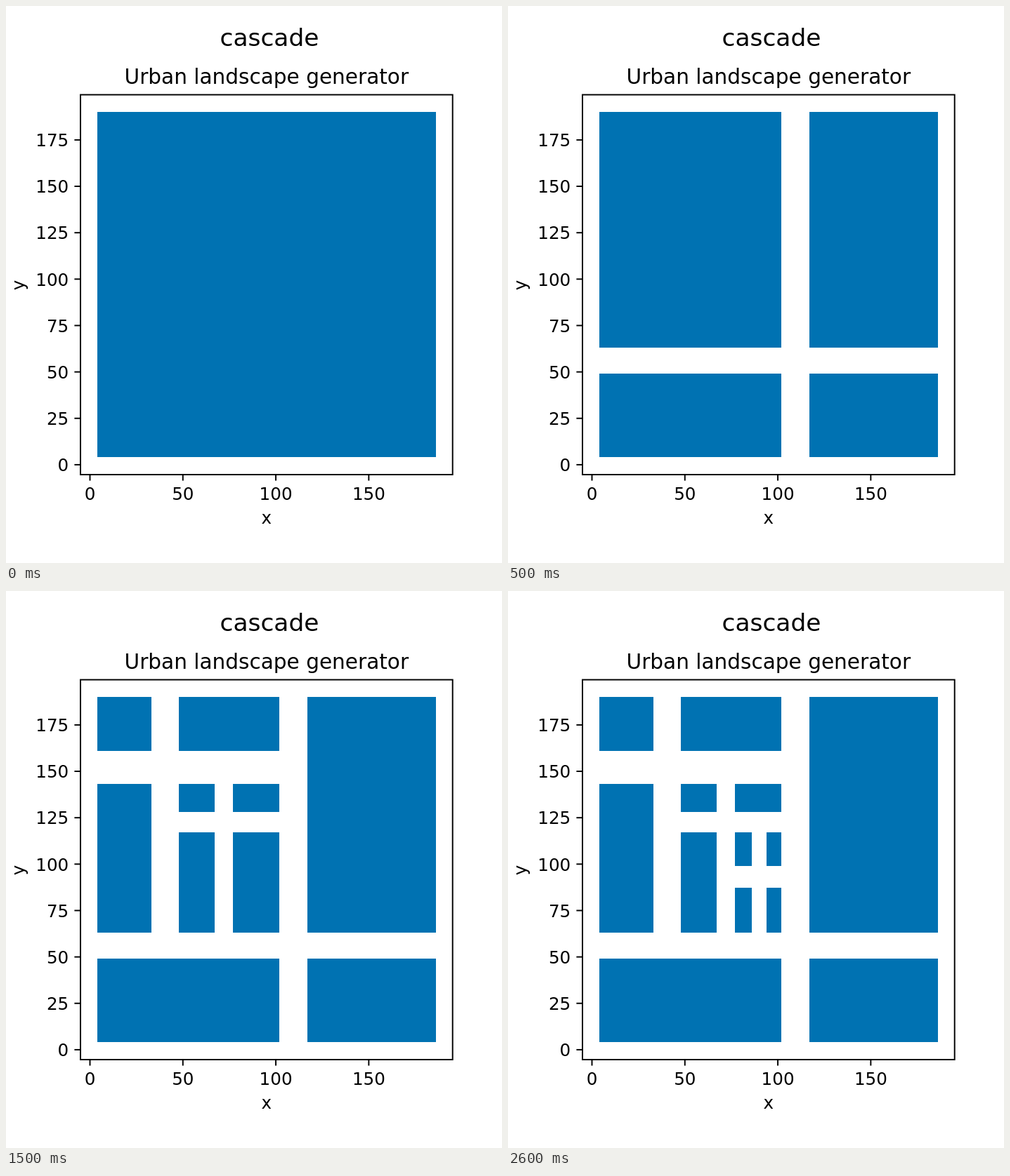
These frames come from a looping animation (706x794 px, 3000 ms). An HTML page with a canvas:

```html
<!DOCTYPE html>
<html lang="en">
<head>
<meta charset="utf-8">
<title>Urban landscape generator</title>
<style>
  html, body { margin: 0; width: 100%; height: 100%; overflow: hidden; background: #fff; }
  canvas { display: block; }
</style>
</head>
<body>
<canvas id="plot" width="706" height="794"></canvas>
<script>
const ctx = document.getElementById('plot').getContext('2d');
const LOOP = 3000, STEP = 500, SCALE = 2.6457;
const INK = '#000', BLOCK = '#0072b2';
const FRAME = { left: 106, top: 126.5, right: 635.7, bottom: 668 };

// Data units to pixels
const px = x => 119.4 + x * SCALE;
const py = y => 653.5 - y * SCALE;

// Each split cuts a cross of streets through one block: [x0, x1, y0, y1]
const CITY = [4, 186, 4, 190];
const SPLITS = [
  { block: CITY, street: [102, 117, 49, 63] },
  { block: [4, 102, 63, 190], street: [33, 48, 143, 161] },
  { block: [48, 102, 63, 143], street: [67, 77, 117, 128] },
  { block: [77, 102, 63, 117], street: [86, 94, 87, 99] }
];

function fillBlock([x0, x1, y0, y1], color) {
  const l = Math.round(px(x0)), r = Math.round(px(x1));
  const t = Math.round(py(y1)), b = Math.round(py(y0));
  ctx.fillStyle = color;
  ctx.fillRect(l, t, r - l, b - t);
}

function cut({ block: b, street: s }) {
  fillBlock([s[0], s[1], b[2], b[3]], '#fff');
  fillBlock([b[0], b[1], s[2], s[3]], '#fff');
}

function label(text, x, y, size, align = 'center') {
  ctx.font = `${size}px "DejaVu Sans", sans-serif`;
  ctx.textAlign = align;
  ctx.fillStyle = INK;
  ctx.fillText(text, x, y);
}

function line(x0, y0, x1, y1) {
  ctx.beginPath();
  ctx.moveTo(x0, y0);
  ctx.lineTo(x1, y1);
  ctx.stroke();
}

function drawAxes() {
  const { left, top, right, bottom } = FRAME;
  ctx.strokeStyle = INK;
  ctx.lineWidth = 1.95;
  ctx.strokeRect(left, top, right - left, bottom - top);
  for (let v = 0; v <= 150; v += 50) {
    const x = px(v) + 0.1;
    line(x, bottom, x, bottom + 8.6);
    label(v, x, 704.3, 24.6);
  }
  for (let v = 0; v <= 175; v += 25) {
    const y = py(v) + 0.4;
    line(left - 8.6, y, left, y);
    label(v, 89.2, y + 9.3, 24.6, 'right');
  }
  label('cascade', 375, 57.2, 34.4);
  label('Urban landscape generator', 370.8, 111.3, 29.55);
  label('x', 370.8, 738, 24.6);
  ctx.save();
  ctx.translate(26.4, 398);
  ctx.rotate(-Math.PI / 2);
  label('y', 0, 0, 24.6);
  ctx.restore();
}

function draw(now) {
  const step = Math.floor((now % LOOP) / STEP);
  ctx.fillStyle = '#fff';
  ctx.fillRect(0, 0, 706, 794);
  fillBlock(CITY, BLOCK);
  SPLITS.slice(0, step).forEach(cut);
  drawAxes();
}

let start;
function tick(now) {
  start ??= now;
  draw(Math.max(0, now - start));
  requestAnimationFrame(tick);
}
draw(0);
requestAnimationFrame(tick);
</script>
</body>
</html>
```
